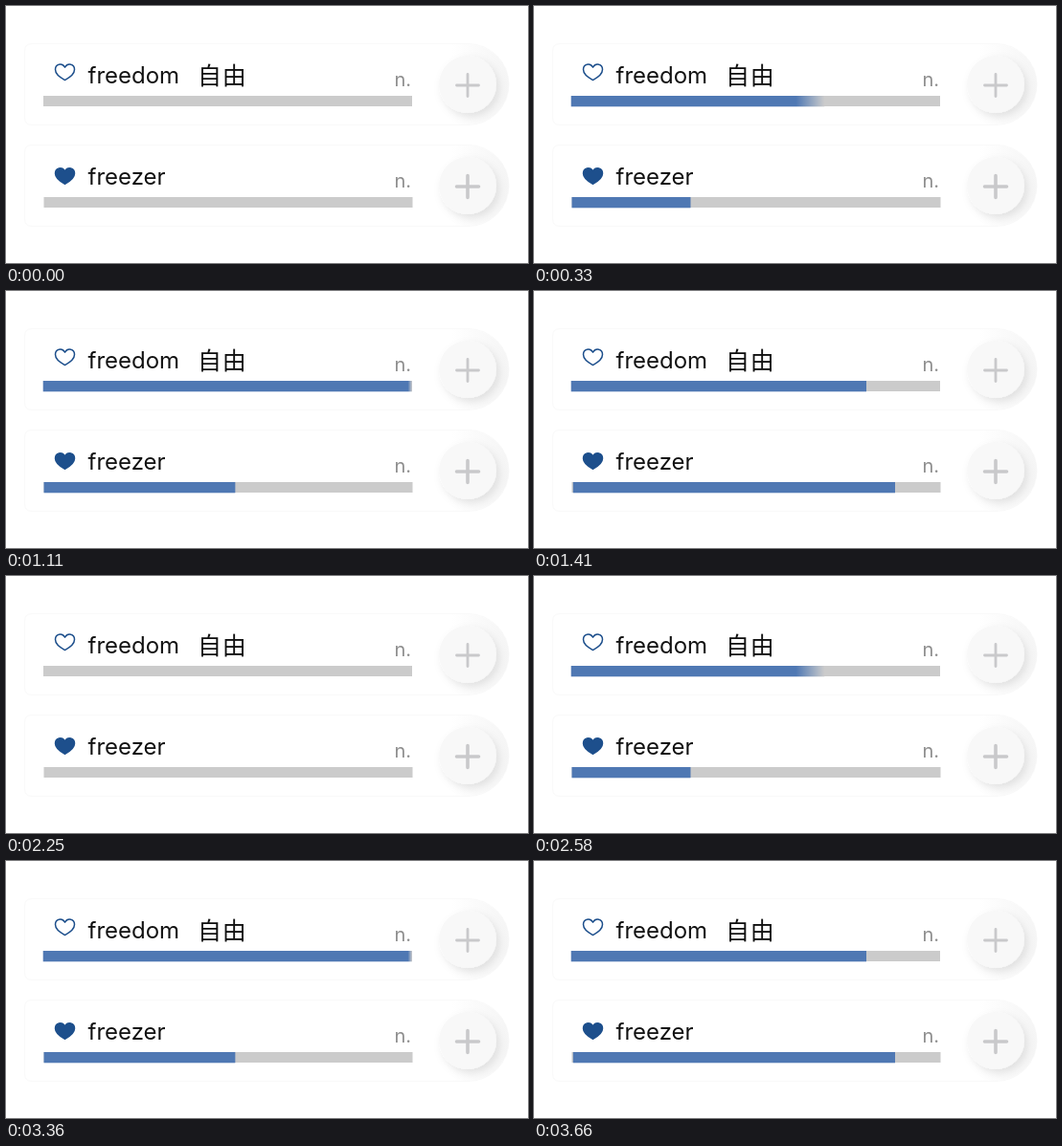
An HTML page that plays this animation: 545x269 px, repeating every 4.53 s.

```html
<!DOCTYPE html>
<html lang="en">
<head>
<meta charset="utf-8">
<title>Word cards</title>
<style>
  html, body { margin: 0; width: 100%; height: 100%; overflow: hidden; background: #fff; }
  svg { display: block; width: 545px; height: 269px; }
  .word { font: 24px Inter, sans-serif; fill: #111; }
  .zh { font: 25px "Noto Sans CJK SC", "Noto Sans CJK", sans-serif; letter-spacing: .8px; fill: #111; }
  .kind { font: 20px Inter, sans-serif; fill: #8e8e8e; }
  .heart { stroke: #1d4f8c; stroke-width: 1.5; stroke-linejoin: round; }
  .plus { stroke: #c9c9cb; stroke-linecap: round; }
</style>
</head>
<body>
<svg viewBox="0 0 545 269">
  <defs>
    <linearGradient id="shade">
      <stop offset=".3" stop-color="#fff"/>
      <stop offset="1" stop-color="#f5f5f5"/>
    </linearGradient>
    <linearGradient id="edge" gradientUnits="userSpaceOnUse" y1="0" y2="0">
      <stop offset="0" stop-color="#4f78b3"/>
      <stop offset="1" stop-color="#cbcbcb"/>
    </linearGradient>
    <filter id="soft" x="-30%" y="-30%" width="170%" height="170%">
      <feDropShadow dx="3" dy="4" stdDeviation="4" flood-color="#000" flood-opacity=".1"/>
    </filter>
    <path id="heart" d="M0 8.3C-4 6.2-10 2-10-2.700C-10-8.800-3-10 0-5.200C3-10 10-8.800 10-2.700C10 2 4 6.200 0 8.300Z"/>
    <g id="card">
      <path d="M27 39.5H482A43 42.5 0 0 1 482 124.5H27Q19.5 124.5 19.5 117V47Q19.5 39.5 27 39.5Z" fill="#fff" stroke="#f9f9f9"/>
      <path d="M440 40H482A43 42 0 0 1 482 124H440Z" fill="url(#shade)"/>
      <circle cx="482" cy="82" r="30" fill="#f8f8f8" filter="url(#soft)"/>
      <text class="kind" x="405.5" y="83.5">n.</text>
    </g>
    <path id="plus" d="M470.5 83H493.5M482 71.5V94.5"/>
  </defs>

  <use href="#card"/>
  <use href="#plus" class="plus" stroke-width="2.8"/>
  <use href="#heart" class="heart" x="61.5" y="69.3" fill="none"/>
  <text class="word" x="85.5" y="81">freedom</text>
  <text class="zh" x="200" y="81.5">自由</text>
  <rect x="39" y="94" width="385" height="11" fill="#cbcbcb"/>
  <rect id="top" x="38.7" y="94" height="11.3" fill="url(#edge)"/>

  <use href="#card" y="106"/>
  <use href="#plus" class="plus" y="106" stroke-width="3.6"/>
  <use href="#heart" class="heart" x="61.5" y="178" fill="#1d4f8c"/>
  <text class="word" x="85.5" y="187">freezer</text>
  <rect x="39.5" y="200" width="385" height="11" fill="#cbcbcb"/>
  <rect id="low" y="200" height="11.3" fill="#4f78b3"/>
</svg>
<script>
const $ = id => document.getElementById(id);
const CYCLE = 2250, LOOP = 4530, STEP = 30;
const ease = p => 0.5 - 0.5 * Math.cos(Math.PI * Math.min(1, Math.max(0, p)));
const mix = (a, b, k) => a + (b - a) * k;
const set = (el, attrs) => Object.entries(attrs).forEach(([k, v]) => el.setAttribute(k, v));

function render(time) {
  const loop = time % LOOP;
  const t = Math.floor((loop < CYCLE ? loop : loop - CYCLE) / STEP) * STEP;
  const fill = at => ease((at - 120) / 360);
  const settle = at => ease((at - 1080) / 330);
  const topAt = at => mix(39, 424, fill(at)) - 77 * settle(at);

  // The upper bar's moving edge is smeared over about half a step.
  const moving = (t >= 150 && t < 480) || (t >= 1110 && t < 1410);
  const blur = moving ? 1.2 : 0;
  const a = topAt(moving ? t - 4 : t), b = topAt(moving ? t + 13 : t);
  const from = Math.min(a, b) - blur, to = Math.min(424, Math.max(a, b) + blur);
  set($("edge"), { x1: from, x2: Math.max(to, from + 0.01) });
  set($("top"), { width: t < 150 ? 0 : to - 38.7 });

  const left = mix(39.5, 40.8, settle(t));
  const right = mix(mix(39.5, 236.5, fill(t)), 377, settle(t));
  set($("low"), { x: left, width: Math.max(0, right - left) });
}

const start = performance.now();
function tick() {
  render(performance.now() - start);
  requestAnimationFrame(tick);
}
tick();
</script>
</body>
</html>
```
